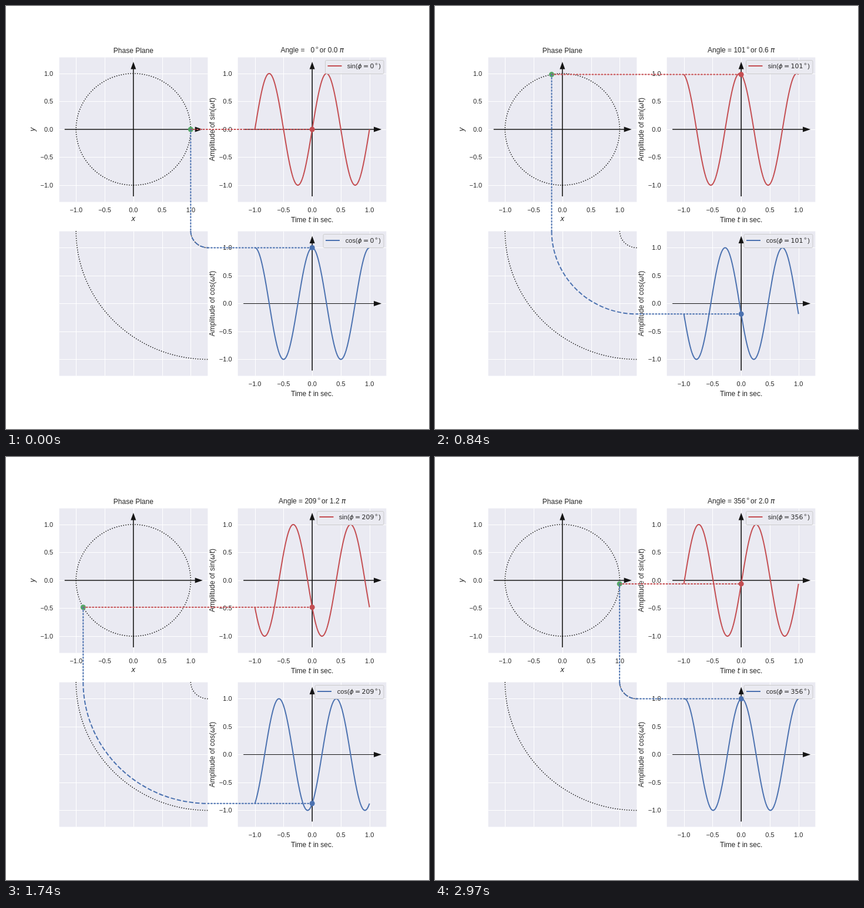
An HTML page with a canvas that plays this animation: 720 px wide and 720 px high, repeating every 3000 ms.

```html
<!DOCTYPE html>
<html lang="en">
<head>
<meta charset="utf-8">
<title>Phase plane</title>
<style>
html, body { margin: 0; width: 100%; height: 100%; overflow: hidden; background: #fff; }
canvas { display: block; width: 720px; height: 720px; }
</style>
</head>
<body>
<canvas width="720" height="720"></canvas>
<script>
const canvas = document.querySelector('canvas');
const g = canvas.getContext('2d');
const UX = 97.55, UY = 95.03;         // pixels per data unit
const LEFT = 216.82, RIGHT = 521.18, TOP = 209.95, BOTTOM = 506.45;
const CORNER = [LEFT + 1.3 * UX, BOTTOM - 1.3 * UY];  // centre of the quarter arcs
const RED = '#c44e52', BLUE = '#4c72b0', GREEN = '#55a868';
const INK = '#262626', BLACK = '#141414', PANEL = '#eaeaf2';
const SANS = '"Liberation Sans", Arial, sans-serif';
const MATH = '"DejaVu Sans", sans-serif';
const TICKS = [-1, -0.5, 0, 0.5, 1];
const TAU = 2 * Math.PI;

// Dash patterns scale with the line width.
const dots = width => [width, 1.65 * width];
const dashes = width => [3.7 * width, 1.6 * width];

function stroke(color, width, dash = [], cap = 'butt') {
  g.strokeStyle = color;
  g.lineWidth = width;
  g.setLineDash(dash);
  g.lineCap = cap;
  g.stroke();
}

function line(x1, y1, x2, y2, ...style) {
  g.beginPath();
  g.moveTo(x1, y1);
  g.lineTo(x2, y2);
  stroke(...style);
}

const link = (x1, y1, x2, y2, color) => line(x1, y1, x2, y2, color, 2, dots(2), 'round');

function dot(x, y, color) {
  g.beginPath();
  g.arc(x, y, 4.5, 0, TAU);
  g.fillStyle = color;
  g.fill();
}

const plain = (text, size = 12) => ({ text, font: `${size}px ${SANS}` });
const math = (text, size = 12) => ({ text, font: `${size}px ${MATH}` });
const italic = (text, size = 12) => ({ text, font: `italic ${size}px ${MATH}` });
const gap = width => ({ width });
const ring = size => ({ ring: size, width: size * 0.72 });

// Lays out mixed-font pieces on one baseline; align 0, 0.5 or 1.
function write(parts, x, y, align = 0.5) {
  const widths = parts.map(p => {
    if (p.width) return p.width;
    g.font = p.font;
    return g.measureText(p.text).width;
  });
  x -= widths.reduce((a, b) => a + b, 0) * align;
  g.fillStyle = INK;
  parts.forEach((p, i) => {
    if (p.text) {
      g.font = p.font;
      g.fillText(p.text, x, y);
    } else if (p.ring) {
      g.beginPath();
      g.arc(x + p.width / 2, y - p.ring * 0.66, p.ring * 0.12, 0, TAU);
      stroke(INK, 0.7);
    }
    x += widths[i];
  });
}

function writeUp(parts, x, y) {
  g.save();
  g.translate(x, y);
  g.rotate(-Math.PI / 2);
  write(parts, 0, 0);
  g.restore();
}

function panel(cx, cy) {
  const x = Math.round(cx - 1.3 * UX) + 0.6, y = Math.ceil(cy - 1.3 * UY) + 0.5;
  const w = 252.8, h = 246;
  g.fillStyle = PANEL;
  g.fillRect(x, y, w, h);
  for (const v of TICKS) {
    const gx = Math.round(cx + v * UX) + 0.5, gy = Math.round(cy - v * UY) + 0.5;
    line(gx, y, gx, y + h, '#fff', 1);
    line(x, gy, x + w, gy, '#fff', 1);
  }
}

function tickLabels(cx, cy) {
  for (const v of TICKS) {
    const label = [plain(v.toFixed(1).replace('-', '\u2212'), 11)];
    write(label, cx + v * UX, Math.round(cy + 141));
    write(label, cx - 136.6, Math.round(cy - v * UY + 4), 1);
  }
}

function head(points) {
  g.beginPath();
  points.forEach(p => g.lineTo(...p));
  g.closePath();
  g.fillStyle = BLACK;
  g.fill();
}

function axes(cx, cy, thickness) {
  const dx = 1.2 * UX, dy = 1.2 * UY;
  line(cx - dx, cy, cx + dx - 10, cy, BLACK, thickness);
  line(cx, cy + dy, cx, cy - dy + 10, BLACK, 1.6);
  head([[cx + dx + 1, cy], [cx + dx - 12.2, cy - 4.5], [cx + dx - 12.2, cy + 4.5]]);
  head([[cx, cy - dy - 1], [cx - 4.5, cy - dy + 11.7], [cx + 4.5, cy - dy + 11.7]]);
}

function wave(cy, fn, phase, color) {
  g.beginPath();
  for (let t = -100; t <= 100; t++) {
    g.lineTo(RIGHT + t / 100 * UX, cy - fn(TAU * t / 100 + phase) * UY);
  }
  g.lineJoin = 'round';
  stroke(color, 2);
}

function quarter(r, ...style) {
  g.beginPath();
  g.ellipse(...CORNER, r * UX, r * UY, 0, Math.PI, Math.PI / 2, true);
  stroke(...style);
}

function legend(name, degrees, cy, color) {
  const shift = name === 'cos' ? 3.5 : 0;
  const left = 543.5 - shift - 7 * (degrees.length - 1);
  const top = Math.floor(cy - 117.5) + 0.5, middle = Math.ceil(cy - 108);
  g.beginPath();
  g.roundRect(left, top, 643 - left, 23, 2.2);
  g.fillStyle = 'rgba(234,234,242,.8)';
  g.fill();
  stroke('#ccc', 1);
  line(left + 4, middle, left + 28, middle, color, 2);
  write([plain(name + '(', 11), italic('\u03d5', 11), gap(2.2), math('=', 11), gap(2.2),
    math(degrees, 11), ring(11), plain(')', 11)], 638, middle + 4, 1);
}

function plot(name, fn, phase, degrees, cy, color, thickness) {
  panel(RIGHT, cy);
  axes(RIGHT, cy, thickness);
  wave(cy, fn, phase, color);
  tickLabels(RIGHT, cy);
  write([plain('Time '), italic('t'), plain(' in sec.')], RIGHT, Math.round(cy + 158));
  writeUp([plain(`Amplitude of ${name}(`), italic('\u03c9t'), plain(')')], 354.5, cy);
  legend(name, degrees, cy, color);
}

function draw(step) {
  const phase = TAU * step / 100;
  const degrees = (step * 3.6).toFixed(0);
  const c = Math.cos(phase), s = Math.sin(phase);
  const x = LEFT + c * UX, y = TOP - s * UY, cosY = BOTTOM - c * UY;

  g.fillStyle = '#fff';
  g.fillRect(0, 0, 720, 720);

  panel(LEFT, TOP);
  g.beginPath();
  g.ellipse(LEFT, TOP, UX, UY, 0, 0, -TAU, true);
  stroke(BLACK, 1.5, dots(1.5));
  axes(LEFT, TOP, 1.6);
  tickLabels(LEFT, TOP);
  write([plain('Phase Plane')], LEFT, 80);
  write([italic('x')], LEFT, 366);
  writeUp([italic('y')], 49, TOP);

  panel(LEFT, BOTTOM);
  quarter(2.3, BLACK, 1.5, dots(1.5));
  quarter(0.3, BLACK, 1.5, dots(1.5));
  quarter(1.3 - c, BLUE, 2, dashes(2));

  plot('sin', Math.sin, phase, degrees, TOP, RED, 1.6);
  plot('cos', Math.cos, phase, degrees, BOTTOM, BLUE, 1.1);
  write([plain(`Angle = ${degrees.padStart(3, '\u00a0')}`), ring(12),
    plain(`or ${(step / 50).toFixed(1)} `), italic('\u03c0')], RIGHT, 79);

  dot(x, y, GREEN);
  link(x, y, RIGHT, y, RED);
  link(x, y, x, CORNER[1], BLUE);
  link(CORNER[0], cosY, RIGHT, cosY, BLUE);
  dot(RIGHT, y, RED);
  dot(RIGHT, cosY, BLUE);
}

function tick() {
  draw(Math.floor(performance.now() / 30) % 100);
  requestAnimationFrame(tick);
}
tick();
</script>
</body>
</html>
```
